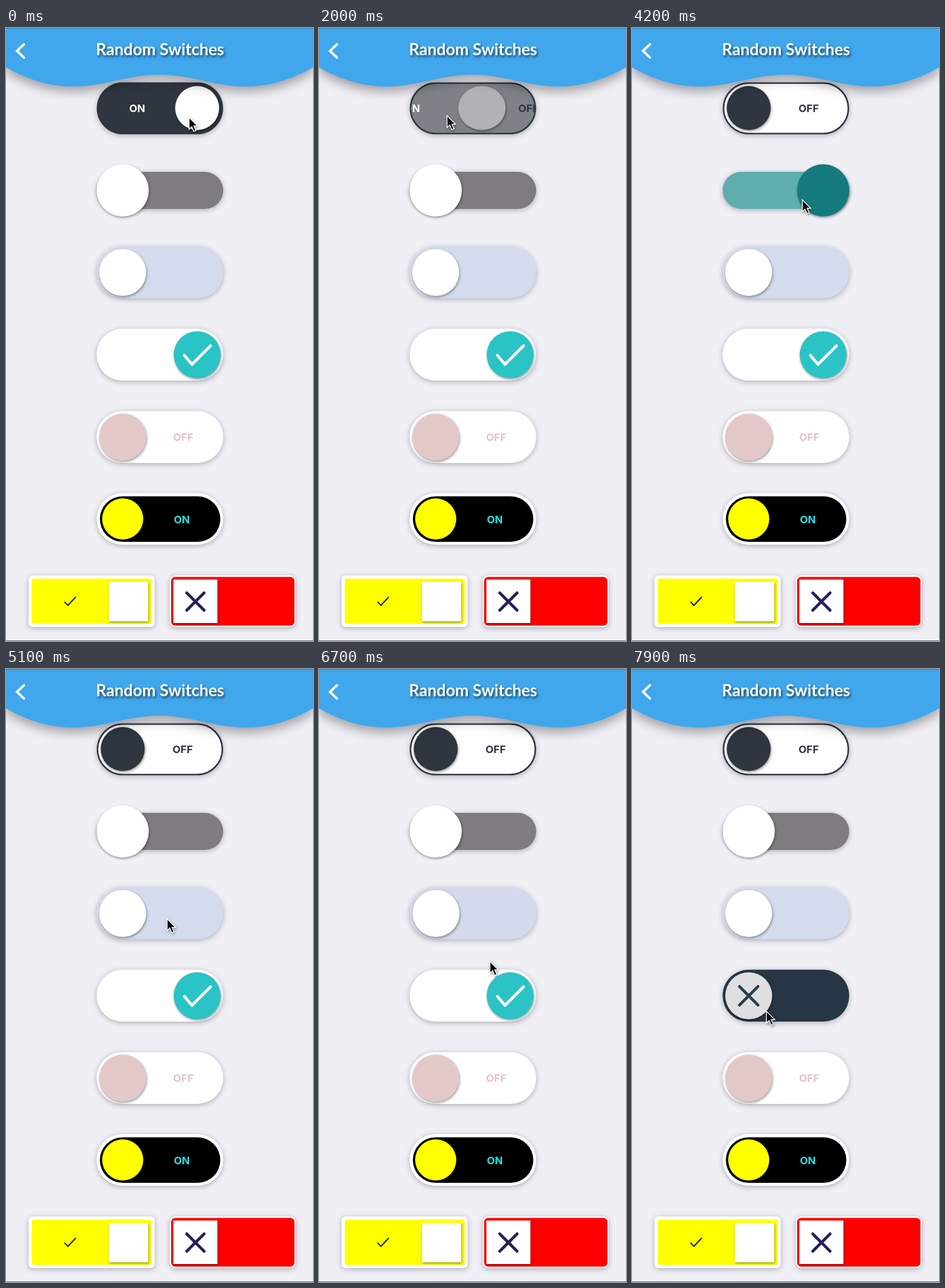
An HTML page for the animation above (8 s loop, 530 by 1057 pixels).

```html
<!DOCTYPE html>
<html lang="en">
<head>
<meta charset="utf-8">
<title>Random Switches</title>
<style>
  html, body { margin: 0; width: 100%; height: 100%; overflow: hidden; background: #f0eff6; }
  svg { display: block; width: 530px; height: 1057px; }
  text { font: 700 18px Inter, sans-serif; text-anchor: middle; }
  .title { font: 700 28px Lato, sans-serif; fill: #fff; text-shadow: 2px 3px 4px rgba(0, 0, 0, .6); }
  .track { filter: drop-shadow(0 2px 5px rgba(0, 0, 0, .28)); }
  .knob { filter: drop-shadow(1px 2px 2px rgba(0, 0, 0, .4)); }
  .header { filter: drop-shadow(0 9px 9px rgba(0, 0, 0, .32)); }
  .icon { fill: none; stroke-width: 5; stroke-linecap: round; stroke-linejoin: round; }
</style>
</head>
<body>
<svg viewBox="0 0 530 1057">
  <clipPath id="pill"><rect x="159" y="96" width="213" height="84" rx="42"/></clipPath>

  <g class="track"><rect id="track1" x="158" y="95" width="215.5" height="87" rx="43.5" stroke="#2f3640" stroke-width="2.6"/></g>
  <g clip-path="url(#pill)">
    <text id="on1" y="144.5" fill="#fff">ON</text>
    <text id="off1" y="144.5" fill="#2f3640">OFF</text>
  </g>
  <g class="knob"><ellipse id="knob1" cy="138" ry="38"/></g>

  <g class="track"><rect id="track2" x="156.5" y="248" width="218.5" height="64" rx="32"/></g>
  <g class="knob"><circle id="knob2" cy="280" r="45"/></g>

  <g class="track"><rect id="track3" x="156.5" y="376.5" width="218.5" height="89.5" rx="44.7"/></g>
  <g id="knob3">
    <circle class="knob" cy="421.5" r="40.5" fill="#fff"/>
    <path id="check3" class="icon" stroke="#241f5c" d="M-22 422l13 15.5 32-32"/>
  </g>

  <g class="track"><rect id="track4" x="156.5" y="518.5" width="218.5" height="89.5" rx="44.7"/></g>
  <g id="knob4">
    <circle id="face4" class="knob" cy="563.5" r="40.5"/>
    <path id="check4" class="icon" stroke="#fff" d="M-22 564.5l13 15.5 32-32"/>
    <path id="cross4" class="icon" stroke="#264050" stroke-width="4" d="M-16 547.5l32 32m0-32l-32 32"/>
  </g>

  <rect class="track" x="156.5" y="660.5" width="218.5" height="89.5" rx="44.7" fill="#fffeff"/>
  <circle class="knob" cx="201.5" cy="705.5" r="40.5" fill="#e3c8ca"/>
  <text x="306" y="712" fill="#e3c4c7">OFF</text>

  <rect class="track" x="156.5" y="802" width="218.5" height="89" rx="44.5" fill="#fff"/>
  <rect x="162" y="807.5" width="208" height="78.5" rx="39.2"/>
  <circle cx="201.5" cy="846.5" r="35.5" fill="#ff0"/>
  <text x="303.5" y="853.5" fill="#20e5e5">ON</text>

  <rect class="track" x="39" y="944" width="217.5" height="89" rx="7" fill="#fff"/>
  <rect x="44.5" y="949.5" width="207" height="78" rx="4" fill="#ff0"/>
  <rect class="knob" x="177.5" y="955" width="68" height="68" fill="#fffeff"/>
  <path d="M101.5 990l5.5 5.5 13-14" fill="none" stroke="#111" stroke-width="2" stroke-linecap="round"/>

  <rect class="track" x="283" y="944" width="217" height="89" rx="9" fill="#fff"/>
  <rect x="285" y="946.5" width="213" height="84" rx="7" fill="#f00"/>
  <rect class="knob" x="289" y="951" width="76" height="75" fill="#fffeff"/>
  <path class="icon" stroke="#241f5c" d="M312 974l30 30m0-30l-30 30"/>

  <path class="header" fill="#40a7ec" d="M0 0V68C40 90 75 101 117 101C170 101 210 80.5 265 80.5C320 80.5 360 101 413 101C455 101 490 90 530 68V0Z"/>
  <path d="M31 28L19 39.5L31 51" fill="none" stroke="#fff" stroke-width="4" stroke-linecap="round"/>
  <text class="title" x="266" y="47">Random Switches</text>
  <rect width="530" height="1" fill="#000" opacity=".3"/>
  <rect y="1056" width="530" height="1" fill="#666"/>

  <path id="cursor" class="knob" fill="#000" stroke="#fff" stroke-width="1.5" d="M0 0V20.5L4.6 16.2L8.2 24.3L12 22.7L8.5 14.8H14.5Z"/>
</svg>
<script>
const LOOP = 8000, SLIDE = 600;
const $ = id => document.getElementById(id);
const set = (id, attrs) => { for (const k in attrs) $(id).setAttribute(k, attrs[k]); };
const ease = u => u <= 0 ? 0 : u >= 1 ? 1 : u < .5 ? 2 * u * u : 1 - 2 * (1 - u) ** 2;
const lerp = (a, b, u) => a + (b - a) * u;
const mix = (a, b, u) => `rgb(${a.map((v, i) => Math.round(lerp(v, b[i], u)))})`;
const knobX = p => lerp(201.5, 330, p);

const WHITE = [255, 254, 255], DARK = [47, 54, 64];

// Each click flips a switch; p runs from 0 (off) to 1 (on).
function position(t, on, clicks) {
  let p = on;
  for (const c of clicks) {
    p = lerp(p, 1 - on, ease((t - c) / SLIDE));
    if (t >= c) on = 1 - on;
  }
  return p;
}

// Cursor rests: arrival, departure, x, y
const stops = [
  [0, 750, 316, 154], [1450, 2050, 221, 151], [2600, 3150, 328, 167],
  [3500, 4650, 294, 296], [5200, 6200, 277, 440], [6650, 6750, 295, 504],
  [7150, 8000, 232, 590]
];

function cursorAt(t) {
  const i = stops.findLastIndex(s => t >= s[0]);
  const a = stops[i], b = stops[i + 1] || a;
  const u = ease((t - a[1]) / (b[0] - a[1] || 1));
  return [lerp(a[2], b[2], u), lerp(a[3], b[3], u)];
}

function draw(now) {
  const t = now % LOOP;

  let p = position(t, 1, [700, 1662, 2660]);
  set('track1', { fill: mix(WHITE, DARK, p) });
  set('knob1', { cx: knobX(p), rx: 38 + 3 * Math.sin(Math.PI * p), fill: mix(DARK, WHITE, p) });
  set('on1', { x: 226.5 - 174 * (1 - p) });
  set('off1', { x: 305 + 91 * p });

  p = position(t, 0, [3500, 4500]);
  set('track2', { fill: mix([127, 124, 127], [95, 174, 174], p) });
  set('knob2', { cx: knobX(p), fill: mix(WHITE, [20, 122, 125], p) });

  p = position(t, 0, [5250, 6130]);
  set('track3', { fill: mix([212, 219, 237], [115, 0, 115], p) });
  set('knob3', { transform: `translate(${knobX(p)})` });
  set('check3', { opacity: p });

  p = position(t, 1, [7180]);
  set('track4', { fill: mix([38, 54, 69], WHITE, p) });
  set('knob4', { transform: `translate(${knobX(p)})` });
  set('face4', { fill: mix([223, 222, 226], [42, 196, 198], p) });
  set('check4', { opacity: p });
  set('cross4', { opacity: 1 - p });

  set('cursor', { transform: `translate(${cursorAt(t)})` });
}

const start = performance.now();
(function tick() {
  draw(performance.now() - start);
  requestAnimationFrame(tick);
})();
</script>
</body>
</html>
```
